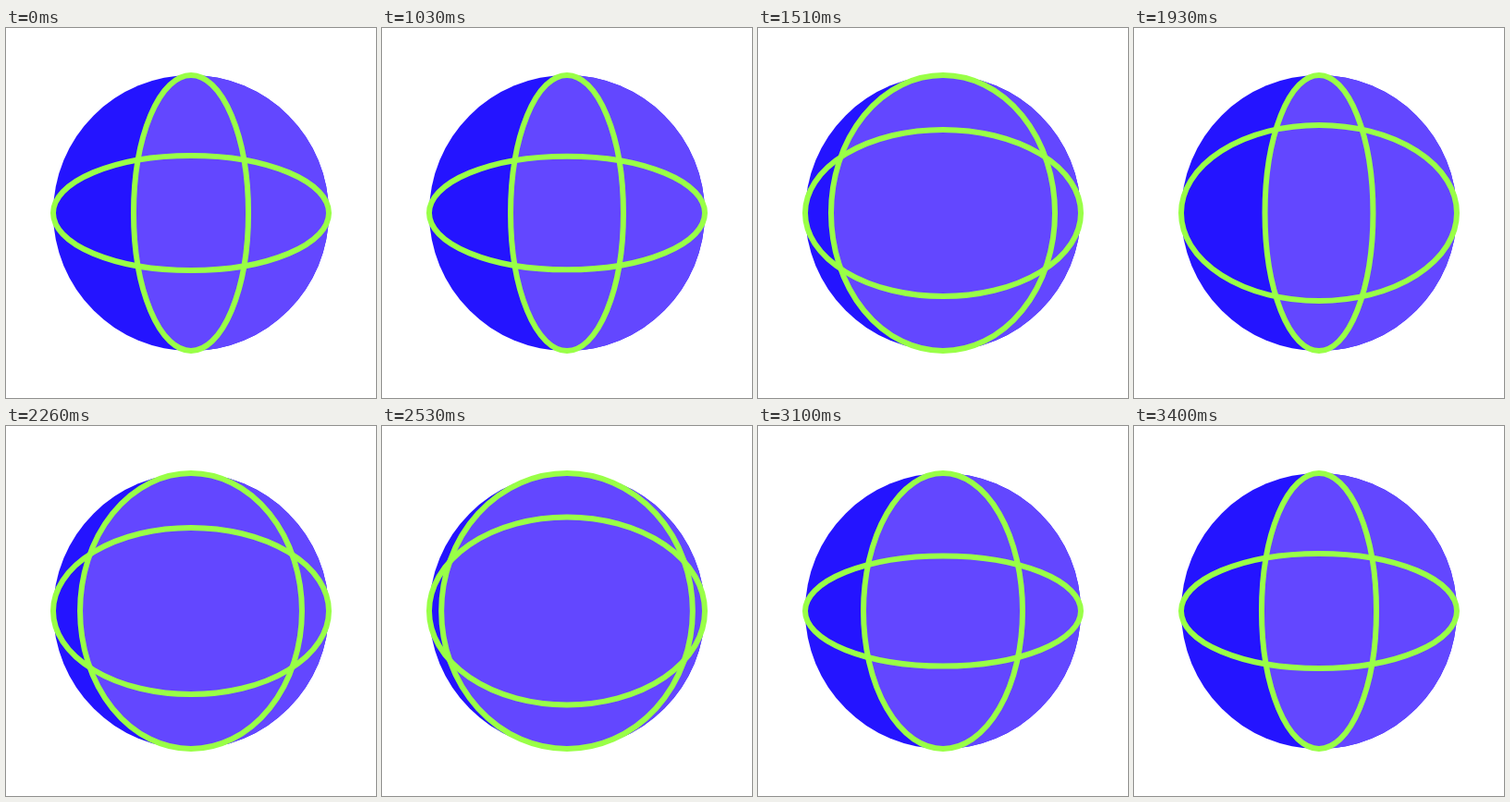
An HTML page that plays this animation: 400x400 px, repeating every 3.43 s.

```html
<!DOCTYPE html>
<html lang="en">
<head>
<meta charset="utf-8">
<title>Globe</title>
<style>
  html, body { margin: 0; width: 100%; height: 100%; overflow: hidden; background: #fff; }
  svg { display: block; width: 100vw; height: 100vh; }
  .ring { fill: none; stroke: #99ff47; stroke-width: 6; }
</style>
</head>
<body>
<svg viewBox="0 0 400 400">
  <circle cx="200" cy="200" r="149" fill="#2414ff"/>
  <path id="light" fill="#6347ff"/>
  <ellipse id="meridian" class="ring" cx="200" cy="200" ry="149"/>
  <ellipse id="equator" class="ring" cx="200" cy="200" rx="149"/>
</svg>
<script>
const LOOP = 3430, HOLD = 1000, STEP = 30, R = 149, TILT = 24.6;

// [step, degrees turned]: a spin that overshoots and settles back
const meridianKeys = [[0, 0], [17, 78.9], [31, 181.5], [42, 258.2], [48, 270], [61, 254.7], [80, 229.2]];
const equatorKeys = [[0, 0], [17, 61.8], [31, 165], [42, 241.8], [47, 249], [61, 230.9], [80, 229.2]];

const slope = (a, b) => (b[1] - a[1]) / (b[0] - a[0]);

// Smooth tangent at key i, at rest on both ends
function tangent(keys, i) {
  const prev = keys[i - 1], key = keys[i], next = keys[i + 1];
  if (!prev || !next) return 0;
  const before = key[0] - prev[0], after = next[0] - key[0];
  return (slope(prev, key) * after + slope(key, next) * before) / (before + after);
}

function turned(keys, step) {
  let i = 0;
  while (i < keys.length - 2 && step > keys[i + 1][0]) i++;
  const [x0, y0] = keys[i], [x1, y1] = keys[i + 1];
  const span = x1 - x0, u = (step - x0) / span, v = 1 - u;
  return y0 + (y1 - y0) * u * u * (3 - 2 * u)
    + span * u * v * (tangent(keys, i) * v - tangent(keys, i + 1) * u);
}

const radius = (keys, step) =>
  R * Math.abs(Math.sin((TILT - turned(keys, step)) * Math.PI / 180));

const light = document.getElementById('light');
const meridian = document.getElementById('meridian');
const equator = document.getElementById('equator');

function draw(now) {
  const t = now % LOOP;
  const step = Math.min(80, Math.max(0, Math.floor((t - HOLD) / STEP)));
  const rx = radius(meridianKeys, step);
  meridian.setAttribute('rx', rx);
  equator.setAttribute('ry', radius(equatorKeys, step));
  light.setAttribute('d', `M200 ${200 - R}A${R} ${R} 0 0 1 200 ${200 + R}A${rx} ${R} 0 0 1 200 ${200 - R}Z`);
}

const start = performance.now();
function tick() {
  draw(performance.now() - start);
  requestAnimationFrame(tick);
}
tick();
</script>
</body>
</html>
```
